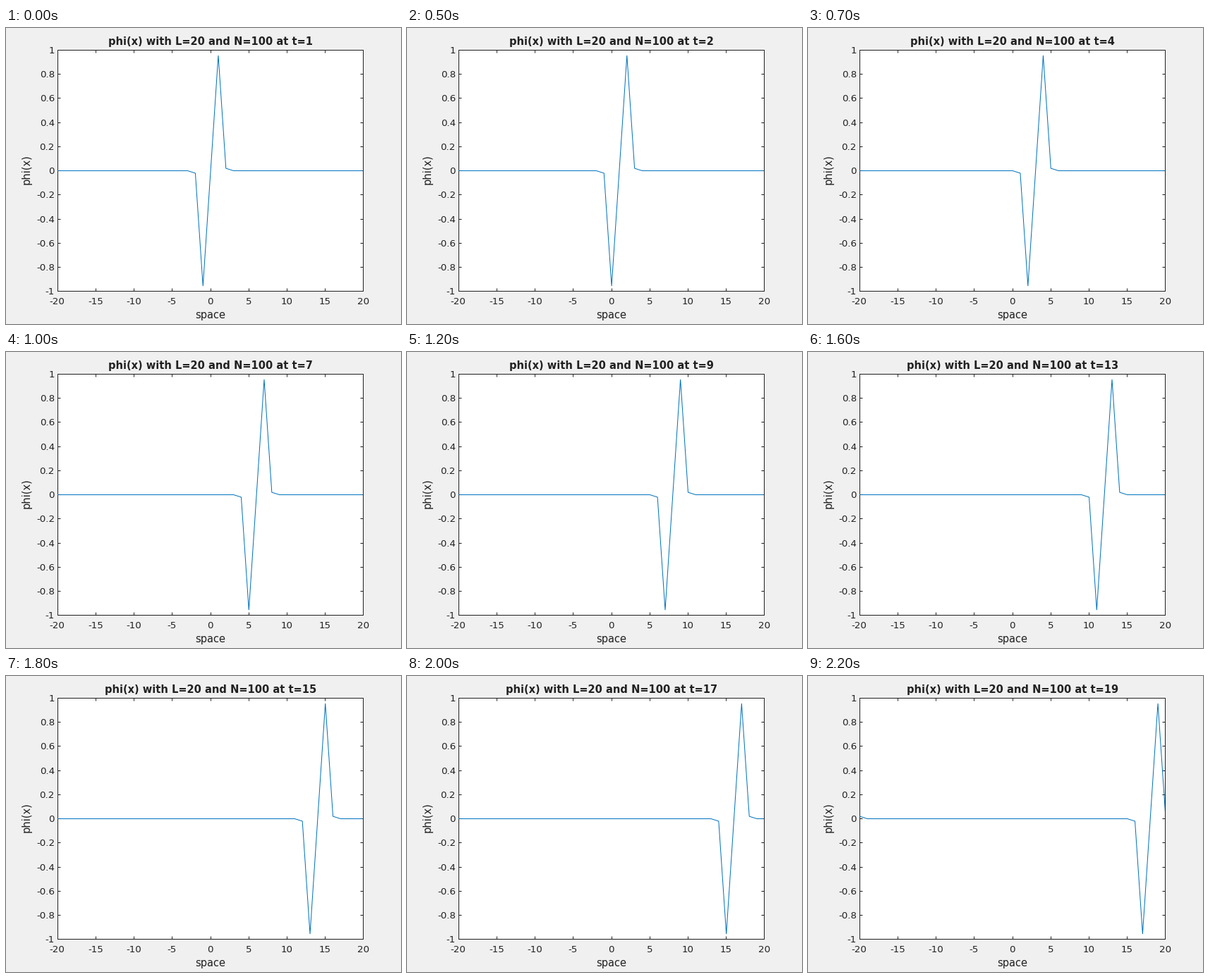
These frames come from a looping animation (560x420 px, 2300 ms). A matplotlib script:

```python
import numpy as np
import matplotlib.pyplot as plt
from matplotlib.animation import FuncAnimation
from matplotlib.transforms import Affine2D

W, H, DPI = 560, 420, 100
PX = 72 / DPI                      # points per pixel
INK = "#212121"
LEFT, RIGHT, TOP, BOTTOM = 72.8, 506.4, 30.9, 373.2
L = 20
STEPS, HOLD = 23, 4                # the first state is held for a while

plt.rcParams["font.family"] = "DejaVu Sans"
fig = plt.figure(figsize=(W / DPI, H / DPI), dpi=DPI, facecolor="#f0f0f0")
ax = fig.add_axes([LEFT / W, 1 - BOTTOM / H,
                   (RIGHT - LEFT) / W, (BOTTOM - TOP) / H])


def label(x, y, text, size=13.33, ha="center", va="baseline", **kw):
    """Text anchored at pixel (x, y), measured from the top left."""
    return fig.text(x / W, 1 - y / H, text, fontsize=size * PX,
                    ha=ha, va=va, color=INK, **kw)


def style_axes():
    xticks = np.arange(-L, L + 1, 5)
    yticks = np.arange(-5, 6) / 5
    ax.set(xlim=(-L, L), ylim=(-1, 1), xticks=xticks, yticks=yticks)
    ax.tick_params(direction="in", length=4.3 * PX, width=PX, color=INK,
                   top=True, right=True, labelbottom=False, labelleft=False)
    for spine in ax.spines.values():
        spine.set(linewidth=PX, color=INK)
    for v in xticks:
        label(LEFT + (v + L) / (2 * L) * (RIGHT - LEFT), 392, f"{v}")
    for v in yticks:
        y = TOP + (1 - v) / 2 * (BOTTOM - TOP)
        label(69, y + 5, f"{v:g}", ha="right")
    label(290, 412, "space", 14.67)
    label(36.6, 201, "phi(x)", 14.67, ha="right", va="center", rotation=90)


def phi(x, t):
    """Odd pulse travelling right on a periodic domain."""
    d = (x - (t - 1) + L) % (2 * L) - L
    return 4.37 * d * np.exp(-1.52 * d**2)


style_axes()
x = np.arange(-L, L + 1)
# Half a pixel of offset puts the curve on pixel centres.
line, = ax.plot(x, phi(x, 1), color="#0072bd", lw=PX, zorder=3,
                solid_joinstyle="miter",
                transform=ax.transData + Affine2D().translate(0.5, -0.5))
title = label(290, 24, "", 14.67, weight="bold")


def update(i):
    t = max(1, i - HOLD + 1)
    line.set_ydata(phi(x, t))
    title.set_text(f"phi(x) with L={L} and N=100 at t={t}")
    return line, title


anim = FuncAnimation(fig, update, frames=STEPS, interval=100,
                     repeat=True, repeat_delay=0, blit=False)
plt.show()
```
